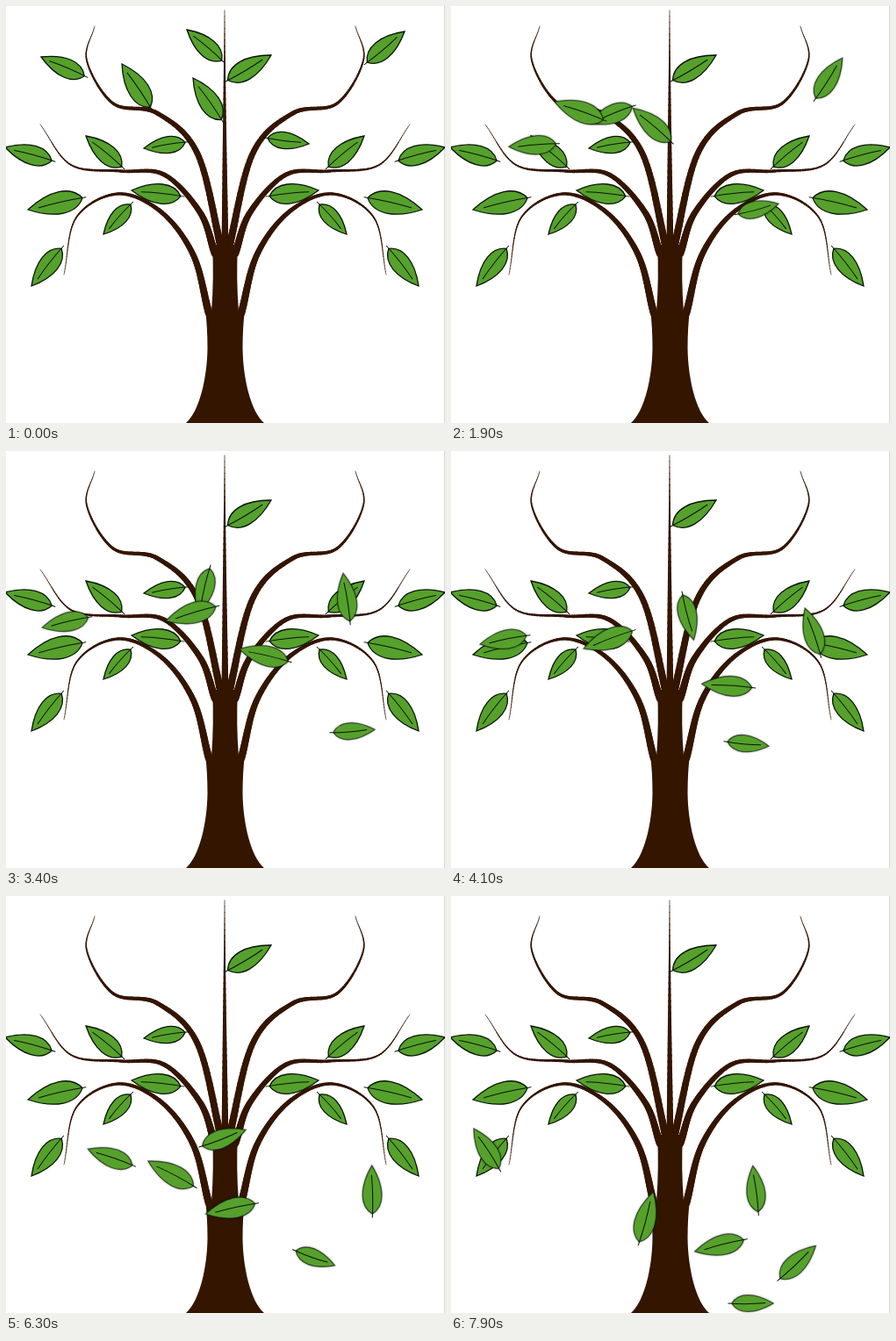
An HTML page with a canvas for the animation above (8000 ms loop, 500x475 px).

```html
<!DOCTYPE html>
<html lang="en">
<head>
<meta charset="utf-8">
<title>Falling leaves</title>
<style>
html, body { margin: 0; width: 100%; height: 100%; overflow: hidden; background: #fff; }
canvas { display: block; }
</style>
</head>
<body>
<canvas id="stage" width="500" height="475"></canvas>
<script>
const LOOP = 8000, STEP = 100, END = 7900, AXIS = 499;
const BARK = '#341500', GREEN = '#56a02c', INK = '#081404';
const ctx = document.getElementById('stage').getContext('2d');

// Smooth curve through rows [t, x, y].
function spline(rows, t) {
  const last = rows.length - 1;
  let i = 0;
  while (i < last - 1 && rows[i + 1][0] < t) i++;
  const p = rows[i], q = rows[i + 1], h = q[0] - p[0];
  const u = Math.min(Math.max((t - p[0]) / h, 0), 1), u2 = u * u, u3 = u2 * u;
  const slope = (k, c) => {
    const a = rows[Math.max(k - 1, 0)], b = rows[Math.min(k + 1, last)];
    return (b[c] - a[c]) / (b[0] - a[0]);
  };
  return [1, 2].map(c => (2 * u3 - 3 * u2 + 1) * p[c] + (3 * u2 - 2 * u3) * q[c]
    + h * ((u3 - 2 * u2 + u) * slope(i, c) + (u3 - u2) * slope(i + 1, c)));
}

// Calls paint for the left half, then for its mirror image.
function bothSides(paint) {
  paint();
  ctx.save();
  ctx.translate(AXIS, 0);
  ctx.scale(-1, 1);
  paint();
  ctx.restore();
}

// Branch that thickens from its tip to its base.
function branch(points, base) {
  const rows = points.map((p, i) => [i, ...p]);
  const n = points.length - 1, steps = n * 20;
  let prev = points[0];
  ctx.strokeStyle = BARK;
  ctx.lineCap = 'round';
  for (let i = 1; i <= steps; i++) {
    const k = i / steps, next = spline(rows, k * n);
    ctx.lineWidth = 0.6 + (base - 0.6) * k ** 1.2;
    ctx.beginPath();
    ctx.moveTo(...prev);
    ctx.lineTo(...next);
    ctx.stroke();
    prev = next;
  }
}

const limbs = [
  [[101, 23], [92, 62], [122, 111], [172, 122], [218, 168], [246, 280]],
  [[39, 135], [74, 181], [130, 188], [180, 192], [221, 235], [238, 282]],
  [[66, 306], [80, 241], [127, 214], [176, 234], [213, 283], [231, 350]]
];

function trunkHalf() {
  ctx.fillStyle = BARK;
  ctx.beginPath();
  ctx.moveTo(250, 475);
  ctx.lineTo(205, 475);
  ctx.bezierCurveTo(220, 462, 229, 425, 229.5, 390);
  ctx.quadraticCurveTo(229.5, 366, 227, 346);
  ctx.lineTo(234, 348);
  ctx.quadraticCurveTo(237, 310, 235, 272);
  ctx.lineTo(250, 272);
  ctx.fill();
}

function tree() {
  bothSides(() => {
    limbs.forEach(points => branch(points, 8.5));
    trunkHalf();
  });
  branch([[249, 5], [249, 140], [249.5, 280]], 8);
}

// Leaf centred on x, y; the angle points from stem to tip.
function leaf(x, y, angle, len, airborne) {
  const s = -len / 2 + 3, e = len / 2, l = e - s, w = len * 0.25;
  ctx.save();
  ctx.translate(x, y);
  ctx.rotate(angle);
  ctx.beginPath();
  ctx.moveTo(s, 0);
  ctx.bezierCurveTo(s + l * 0.16, -w, s + l * 0.55, -w, e, 0);
  ctx.bezierCurveTo(s + l * 0.55, w, s + l * 0.16, w, s, 0);
  ctx.fillStyle = GREEN;
  if (airborne) {
    ctx.shadowColor = 'rgba(0,0,0,0.5)';
    ctx.shadowBlur = 3;
  }
  ctx.fill();
  ctx.shadowColor = 'transparent';
  ctx.strokeStyle = airborne ? 'rgba(8,20,4,0.6)' : INK;
  ctx.lineWidth = 1.3;
  ctx.stroke();
  ctx.strokeStyle = INK;
  ctx.lineWidth = 1;
  ctx.beginPath();
  ctx.moveTo(s - 4, 0);
  ctx.quadraticCurveTo(s + l * 0.4, 1.5, s + l * 0.8, -0.5);
  ctx.stroke();
  ctx.restore();
}

// Pose of a leaf hanging between stem and tip.
function hang([sx, sy, tx, ty]) {
  const dx = tx - sx, dy = ty - sy;
  return { x: (sx + tx) / 2, y: (sy + ty) / 2, angle: Math.atan2(dy, dx), len: Math.hypot(dx, dy) };
}

function fixedLeaf(ends) {
  const { x, y, angle, len } = hang(ends);
  leaf(x, y, angle, len, false);
}

const single = [[250, 86, 302, 56], [207, 155, 157, 162]];
const paired = [
  [55, 177, -1, 161], [134, 185, 91, 148], [90, 218, 25, 232],
  [202, 217, 143, 210], [144, 224, 111, 260], [65, 274, 29, 319]
];

// Falling leaves drift through one point per beat while they spin and rock (degrees).
const beats = [1100, 2600, 3400, 4900, 6300, END];
const falling = [];
function fall(start, ends, spin, rock, waves, path) {
  const home = hang(ends);
  const times = beats.slice(-path.length);
  const rows = [[start, home.x, home.y], ...path.map((p, i) => [times[i], ...p])];
  falling.push({ start, home, spin, rock, waves, rows });
}

fall(0, [248, 64, 206, 27], -318, 20, 1,
  [[190, 82], [188, 156], [226, 158], [304, 227], [247, 276], [347, 335]]);
fall(900, [166, 118, 132, 66], 49, -100, 1,
  [[147, 97], [156, 143], [212, 185], [141, 248], [189, 317], [222, 367]]);
fall(0, [92, 81, 40, 58], 34, -52, 1,
  [[72, 131], [107, 178], [69, 195], [66, 241], [120, 298], [41, 289]]);
fall(1200, [247, 132, 213, 82], -69, -22, 1,
  [[238, 170], [295, 233], [320, 301], [257, 356], [307, 398]]);
fall(1400, [409, 66, 454, 29], -3, -70, 1,
  [[423, 131], [388, 168], [442, 253], [417, 336], [394, 418]]);
fall(0, [295, 150, 345, 157], -8, -20, 2,
  [[313, 188], [383, 273], [395, 319], [280, 349], [351, 412], [342, 464]]);

function fallingLeaf({ start, home, spin, rock, waves, rows }, t) {
  const u = Math.max(0, (t - start) / (END - start));
  const turn = spin * u + rock * Math.sin(Math.PI * waves * u);
  leaf(...spline(rows, t), home.angle + turn * Math.PI / 180, home.len, t > start);
}

function draw(now) {
  const t = Math.floor(now % LOOP / STEP) * STEP;
  ctx.fillStyle = '#fff';
  ctx.fillRect(0, 0, 500, 475);
  ctx.fillStyle = '#d4d4d4';
  ctx.fillRect(499, 0, 1, 475);
  tree();
  single.forEach(fixedLeaf);
  bothSides(() => paired.forEach(fixedLeaf));
  falling.forEach(f => fallingLeaf(f, t));
}

const begin = performance.now();
function tick() {
  draw(performance.now() - begin);
  requestAnimationFrame(tick);
}
tick();
</script>
</body>
</html>
```
